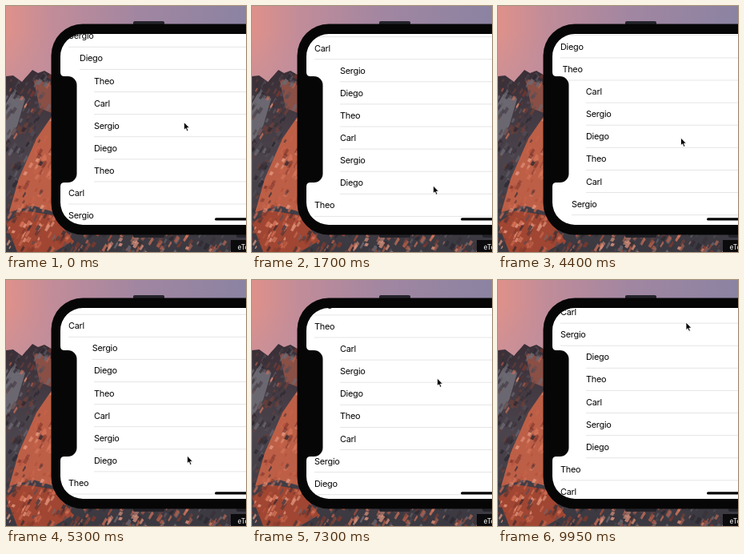
Recreate the animation shown at these times as an HTML page. Size 300x308 px, loop 10 s.

```html
<!DOCTYPE html>
<html lang="en">
<head>
<meta charset="utf-8">
<title>List around the notch</title>
<style>
html, body { margin: 0; width: 100%; height: 100%; overflow: hidden; background: #060607; }
svg { display: block; width: 300px; height: 308px; }
text { font-family: Inter, "Open Sans", sans-serif; }
.row text { font-size: 10.9px; letter-spacing: -.25px; fill: #050505; }
.row path { stroke: #e5e5e7; }
</style>
</head>
<body>
<svg viewBox="0 0 300 308">
  <defs>
    <linearGradient id="sky">
      <stop offset="0" stop-color="#df918a"/>
      <stop offset=".2" stop-color="#c18c99"/>
      <stop offset=".55" stop-color="#a186a1"/>
      <stop offset="1" stop-color="#8b83a2"/>
    </linearGradient>
    <linearGradient id="haze" x1="0" y1="0" x2="0" y2="1">
      <stop offset=".3" stop-color="#bd8f9f" stop-opacity="0"/>
      <stop offset="1" stop-color="#bd8f9f" stop-opacity=".7"/>
    </linearGradient>
    <linearGradient id="rock" x1="0" y1="0" x2="0" y2="1">
      <stop offset="0" stop-color="#3a2e36"/>
      <stop offset=".5" stop-color="#4b444d"/>
      <stop offset="1" stop-color="#3a3840"/>
    </linearGradient>
    <clipPath id="land"><path d="M0 88 9 87 20 95 33 80 40 84 48 81 60 88H300V308H0Z"/></clipPath>
    <clipPath id="screen"><path d="M301 35H96A28 28 0 0 0 68 63V83Q68 88 73 88H77.5A11 11 0 0 1 88.5 99V210A11 11 0 0 1 77.5 221H73Q68 221 68 226V246A28 28 0 0 0 96 274H301Z"/></clipPath>
  </defs>

  <rect width="300" height="110" fill="url(#sky)"/>
  <rect width="60" height="110" fill="url(#haze)"/>
  <g clip-path="url(#land)">
    <rect y="78" width="300" height="230" fill="url(#rock)"/>
    <path fill="#6b6770" d="M8 108 24 116 14 150 0 172V122Z"/>
    <path fill="#8a4f45" d="M34 90 60 100V135L42 128Z"/>
    <path fill="#bd5f47" d="M60 134V258L34 250 4 258 16 216 38 166Z"/>
    <path fill="#a04632" d="M0 272 22 256 60 262 84 294 60 308H14Z"/>
    <g id="shards"></g>
  </g>

  <path fill="#24242b" d="M159 24V20.5Q159 19 161 19H196Q198 19 198 20.5V24ZM159 285H198V288.5Q198 290 196 290H161Q159 290 159 288.5ZM288 285H300V290H290Q288 290 288 288Z"/>
  <path fill="#060607" d="M304 22.5H96A39.5 39.5 0 0 0 56.5 62V247A39.5 39.5 0 0 0 96 286.5H304Z"/>
  <g clip-path="url(#screen)">
    <rect x="67" y="34" width="233" height="241" fill="#fff"/>
    <g id="list"></g>
    <rect x="261" y="265.2" width="50" height="3.4" rx="1.7" fill="#050505"/>
  </g>
  <rect x="281" y="293" width="19" height="15" fill="#0b0b0d"/>
  <text x="289.5" y="304.5" font-size="8.5" fill="#f2f2f2">eTo</text>
  <path id="cursor" fill="#000" stroke="#fff" stroke-width=".8" stroke-linejoin="round"
    d="M0 0V9.6L2.2 7.7 3.7 11.3 5.4 10.6 3.9 7.1H6.9Z"/>
</svg>
<script>
const NS = 'http://www.w3.org/2000/svg';
const LOOP = 10000, STEP = 50, PITCH = 28.1;
const NAMES = ['Theo', 'Carl', 'Sergio', 'Diego'];
const EDGE = 78, INSET = 110, ZONE = [71, 226], SLIDE = 300;

// Where each drag ends: time, list offset
const DRAGS = [
  [-500, 105], [500, 82], [1700, 137], [2700, 160], [3000, 160], [3950, 36],
  [4850, 122], [5700, 158], [6700, 100], [7050, 58], [7300, 58], [9400, 12]
];
// Pointer: time, x, height above or below the list offset
const GRIPS = [
  [0, 222.5, 52], [1700, 226.5, 88], [3000, 222.5, 60], [4400, 228.5, 86],
  [6200, 224.5, 71], [7300, 231.5, 65], [9400, 235, 41]
];

const mod = (a, n) => ((a % n) + n) % n;
const smooth = u => u * u * (3 - 2 * u);

function make(tag, parent, attrs = {}) {
  const el = document.createElementNS(NS, tag);
  for (const key in attrs) el.setAttribute(key, attrs[key]);
  return parent.appendChild(el);
}

// Eased value of one column at time t
function ease(keys, t, col) {
  const next = keys.findIndex(key => key[0] > t);
  if (next < 0) return keys[keys.length - 1][col];
  const b = keys[next], a = keys[Math.max(0, next - 1)];
  if (a === b) return a[col];
  return a[col] + (b[col] - a[col]) * smooth((t - a[0]) / (b[0] - a[0]));
}

// A row beside the notch slides in; its position trails the list by SLIDE ms
const LAGS = Array.from({ length: 24 }, (_, i) => {
  const u = (i + .5) / 24;
  return { ms: u * SLIDE, weight: 6 * u * (1 - u) / 24 };
});

function indent(k, past) {
  let share = 0;
  LAGS.forEach(({ weight }, i) => {
    const y = past[i] + k * PITCH;
    if (y > ZONE[0] && y < ZONE[1]) share += weight;
  });
  return EDGE + (INSET - EDGE) * Math.min(1, share);
}

// Thin slanted facets, warm on the sunlit slope and grey in the shade
function drawShards() {
  let seed = 41;
  const rand = () => (seed = seed * 16807 % 2147483647) / 2147483647;
  const pick = list => list[Math.floor(rand() * list.length)];
  const lit = ['#d9775c', '#e79a82', '#b4513a', '#81382d', '#c9644a'];
  const shade = ['#29252d', '#3a3138', '#544e57', '#6c6a74', '#6e4039'];
  const box = document.getElementById('shards');
  const shard = (x, y, warm) => {
    const w = 1 + rand() * 3, h = 4 + rand() * 7;
    make('path', box, {
      d: `M${x} ${y}l${w} ${h * .3} ${-h * .45} ${h * .7} ${-w} ${-h * .2}Z`,
      fill: pick(rand() < warm ? lit : shade), opacity: .4 + rand() * .4
    });
  };
  for (let i = 0; i < 260; i++) {
    const x = rand() * 64, y = 82 + rand() * 220;
    shard(x, y, y > 130 + (60 - x) * 2.1 ? .8 : .08);
  }
  for (let i = 0; i < 130; i++) shard(60 + rand() * 240, 280 + rand() * 26, .45);
}

const list = document.getElementById('list');
const cursor = document.getElementById('cursor');
const rows = Array.from({ length: 11 }, () => {
  const g = make('g', list, { class: 'row' });
  return { g, label: make('text', g, { y: 4 }), line: make('path', g) };
});

function draw(t) {
  const top = ease(DRAGS, t, 1);
  const past = LAGS.map(lag => ease(DRAGS, t - lag.ms, 1));
  const first = Math.floor((15 - top) / PITCH);
  rows.forEach(({ g, label, line }, i) => {
    const k = first + i, x = indent(k, past);
    g.setAttribute('transform', `translate(0 ${top + k * PITCH})`);
    label.textContent = NAMES[mod(k, NAMES.length)];
    label.setAttribute('x', x);
    line.setAttribute('d', `M${x} 14H300`);
  });
  cursor.setAttribute('transform', `translate(${ease(GRIPS, t, 1)} ${top + ease(GRIPS, t, 2)})`);
}

drawShards();
const start = performance.now();
function tick() {
  const t = (performance.now() - start) % LOOP;
  draw(Math.floor(t / STEP) * STEP);
  requestAnimationFrame(tick);
}
tick();
</script>
</body>
</html>
```
